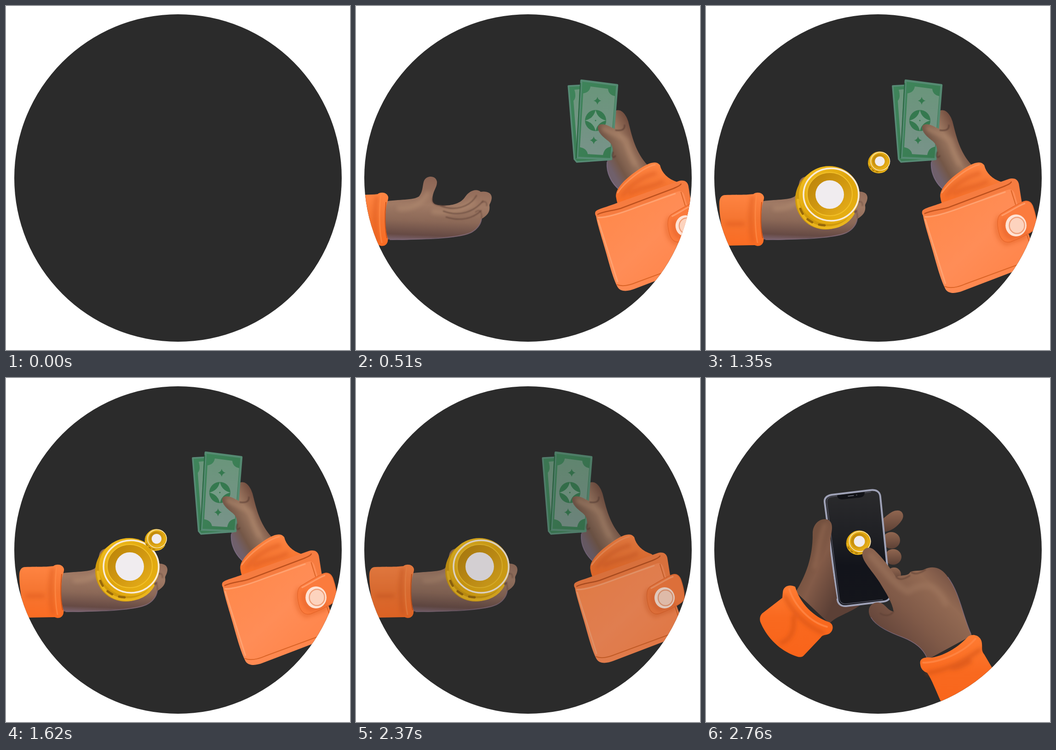
An HTML page that plays this animation: 748x748 px, repeating every 3.15 s.

```html
<!DOCTYPE html>
<html lang="en">
<head>
<meta charset="utf-8">
<title>Coins to wallet</title>
<style>
  html, body { margin: 0; width: 100%; height: 100%; overflow: hidden; background: #fff; }
  svg { display: block; width: 100%; height: 100%; }
  .line { fill: none; stroke-linecap: round; stroke-linejoin: round; }
  .soft { filter: url(#blur); }
  .crease { filter: url(#crease); }
</style>
</head>
<body>
<svg viewBox="0 0 748 748">
  <defs>
    <filter id="blur" x="-40%" y="-40%" width="180%" height="180%"><feGaussianBlur stdDeviation="4"/></filter>
    <filter id="crease" x="-20%" y="-20%" width="140%" height="140%"><feGaussianBlur stdDeviation="1.2"/></filter>
    <clipPath id="disc"><circle cx="374" cy="374" r="356"/></clipPath>

    <linearGradient id="palm" gradientUnits="userSpaceOnUse" x1="220" y1="370" x2="214" y2="510">
      <stop offset="0" stop-color="#8a6353"/><stop offset=".45" stop-color="#a07a65"/>
      <stop offset=".7" stop-color="#8b6857"/><stop offset=".92" stop-color="#664a44"/><stop offset="1" stop-color="#78606a"/>
    </linearGradient>
    <linearGradient id="grip" gradientUnits="userSpaceOnUse" x1="490" y1="340" x2="562" y2="300">
      <stop offset="0" stop-color="#70606b"/><stop offset=".25" stop-color="#745747"/>
      <stop offset=".65" stop-color="#9c7760"/><stop offset="1" stop-color="#744f40"/>
    </linearGradient>
    <linearGradient id="holder" gradientUnits="userSpaceOnUse" x1="215" y1="400" x2="300" y2="440">
      <stop offset="0" stop-color="#74513f"/><stop offset=".35" stop-color="#835b48"/><stop offset="1" stop-color="#5c4036"/>
    </linearGradient>
    <linearGradient id="tapper" gradientUnits="userSpaceOnUse" x1="390" y1="560" x2="520" y2="430">
      <stop offset="0" stop-color="#65463b"/><stop offset=".4" stop-color="#805a48"/>
      <stop offset=".8" stop-color="#936a53"/><stop offset="1" stop-color="#7c5747"/>
    </linearGradient>
    <linearGradient id="knuckle" x1="0" y1="0" x2="0" y2="1">
      <stop offset="0" stop-color="#906650"/><stop offset="1" stop-color="#5c4035"/>
    </linearGradient>
    <linearGradient id="cuff" x1="0" y1="0" x2="0" y2="1">
      <stop offset="0" stop-color="#ff7c33"/><stop offset=".45" stop-color="#f9691f"/><stop offset="1" stop-color="#f9641a"/>
    </linearGradient>
    <linearGradient id="sleeve" x1="0" y1="0" x2="0" y2="1">
      <stop offset="0" stop-color="#ff8543"/><stop offset=".5" stop-color="#f57531"/><stop offset="1" stop-color="#fb6c23"/>
    </linearGradient>
    <linearGradient id="leather" x1="0" y1="0" x2="1" y2="1">
      <stop offset="0" stop-color="#ff8747"/><stop offset=".5" stop-color="#ff8d57"/><stop offset="1" stop-color="#ff8043"/>
    </linearGradient>
    <linearGradient id="bill" x1="0" y1="0" x2="1" y2="1">
      <stop offset="0" stop-color="#3f855b"/><stop offset="1" stop-color="#37784f"/>
    </linearGradient>
    <linearGradient id="paper" x1="0" y1="0" x2="0" y2="1">
      <stop offset="0" stop-color="#6a957b"/><stop offset="1" stop-color="#789389"/>
    </linearGradient>
    <linearGradient id="gold" x1="0" y1="0" x2="1" y2="1">
      <stop offset="0" stop-color="#f4c324"/><stop offset=".5" stop-color="#dfa50c"/><stop offset="1" stop-color="#e9b317"/>
    </linearGradient>
    <linearGradient id="well" x1="0" y1="0" x2="1" y2="1">
      <stop offset="0" stop-color="#b88209"/><stop offset=".5" stop-color="#d09710"/><stop offset="1" stop-color="#e8b01b"/>
    </linearGradient>
    <linearGradient id="screen" x1="0" y1="0" x2="0" y2="1">
      <stop offset="0" stop-color="#2b2b2d"/><stop offset=".4" stop-color="#1f2024"/>
      <stop offset=".65" stop-color="#12141b"/><stop offset="1" stop-color="#14151b"/>
    </linearGradient>

    <path id="star" d="M0,-1Q.18,-.18 1,0Q.18,.18 0,1Q-.18,.18 -1,0Q-.18,-.18 0,-1Z"/>

    <!-- Coin centred on the origin, about 70 in radius -->
    <g id="coin">
      <ellipse cx="-5" cy="3" rx="66" ry="66" fill="#d09a0d"/>
      <path class="line" d="M-65,5C-62,42 -38,64 -4,65C22,66 44,54 55,34" stroke="#eab51d" stroke-width="6"/>
      <path class="line" d="M-60,24C-52,45 -34,59 -5,60" stroke="#98690a" stroke-width="5" stroke-dasharray="12 16"/>
      <ellipse cx="3" cy="-6" rx="66" ry="63" fill="url(#gold)"/>
      <ellipse cx="7" cy="-7" rx="60" ry="57" fill="none" stroke="#f8ebda" stroke-width="3.5"/>
      <ellipse cx="4" cy="-8" rx="49" ry="47" fill="url(#well)" stroke="#f2c02a" stroke-width="2"/>
      <circle cx="4" cy="-7" r="31" fill="#f0ecef"/>
    </g>
  </defs>

  <circle cx="374" cy="374" r="356" fill="#2b2b2b"/>
  <g clip-path="url(#disc)">
    <g id="trade">
      <g id="giver">
        <path fill="url(#palm)" d="M118,425C150,420 180,423 193,414C203,402 200,386 205,378C211,368 230,368 232,382C233,394 222,403 222,421C222,431 230,433 243,434C265,434 284,430 294,414C302,402 318,396 327,404C338,402 352,405 351,418C350,427 346,430 346,434C348,447 342,455 329,463C326,480 313,491 297,497C275,504 240,503 206,506C175,509 145,509 118,507Z"/>
        <path class="line soft" stroke="#b08a70" stroke-width="11" opacity=".6" d="M150,440C180,442 200,428 212,408M225,447C255,451 285,448 310,425"/>
        <g class="line crease" stroke="#604338" stroke-width="2.5">
          <path d="M239,434C270,447 303,438 318,412M246,446C280,459 312,448 332,424M252,459C284,469 310,462 328,445" opacity=".7"/>
          <path d="M222,418C219,430 231,436 250,434M330,427C337,423 341,427 340,434M316,448C325,440 330,448 329,461" opacity=".5"/>
        </g>
        <path class="line" stroke="#816a78" stroke-width="2" d="M130,508C190,507 270,507 305,493C318,487 327,476 329,463" opacity=".8"/>
        <path fill="url(#sleeve)" d="M42,411C72,410 87,411 103,409C109,404 123,404 126,415C127,421 122,428 121,443C119,466 120,489 125,505C127,519 116,525 106,520L48,521C36,502 29,460 29,429C29,418 33,411 42,411Z"/>
        <path class="line soft" stroke="#d9581f" stroke-width="8" opacity=".55" d="M101,417C96,445 96,486 102,511M46,474H80"/>
        <path class="line" stroke="#ff8a46" stroke-width="3" opacity=".7" d="M110,411C106,440 106,486 112,514"/>
        <path class="line" stroke="#b9440f" stroke-width="2" opacity=".7" d="M121,427C118,455 119,486 123,504"/>
      </g>

      <use id="bigCoin" href="#coin"/>

      <g id="payer">
        <path fill="url(#grip)" d="M508,228C520,222 531,235 536,251C544,282 551,317 578,346L520,404C498,386 487,361 490,337C499,320 506,290 506,265Z"/>
        <path fill="url(#bill)" stroke="#578a75" stroke-width="3.5" stroke-linejoin="round" d="M406,174L445,172L495,334L424,339L419,333Z"/>
        <path fill="url(#paper)" d="M419,182L430,181L424,300L417,206Q424,199 419,182Z"/>
        <path fill="url(#bill)" stroke="#558a72" stroke-width="4.5" stroke-linejoin="round" d="M434,162L512,172L499,333L425,330Z"/>
        <path class="line" stroke="#27643e" stroke-width="2" d="M432,168L423,330"/>
        <path fill="url(#paper)" d="M454,175L492,180Q493,193 507,196L498,306Q484,308 481,324L448,322Q446,310 431,307L438,190Q452,188 454,175Z"/>
        <circle cx="465" cy="249" r="23" fill="#35794f"/>
        <use href="#star" fill="#759c87" transform="translate(465 249) scale(23)"/>
        <circle cx="465" cy="249" r="1.5" fill="#35794f"/>
        <use href="#star" fill="#35794f" transform="translate(469 206) scale(8.5)"/>
        <use href="#star" fill="#35794f" transform="translate(461 292) scale(8.5)"/>
        <path fill="url(#grip)" d="M470,264C470,255 484,256 494,261C507,268 523,276 529,260L542,286C552,315 525,338 502,334C503,317 505,303 492,293C483,286 470,276 470,264Z"/>
        <path class="line soft" stroke="#ab846b" stroke-width="10" opacity=".7" d="M483,267C506,280 524,283 532,293C537,313 541,327 550,343"/>
        <path class="line crease" stroke="#573b32" stroke-width="2.5" opacity=".8" d="M509,270C521,272 529,269 528,259M503,318C499,329 504,332 508,326"/>
        <path class="line" stroke="#806f8b" stroke-width="2" opacity=".7" d="M490,340C488,362 499,386 518,400"/>
        <path fill="url(#sleeve)" d="M510,418C505,400 528,377 551,361C574,344 595,333 605,346C609,363 622,376 643,383L656,396L520,448C513,430 511,425 510,418Z"/>
        <path class="line soft" stroke="#dc5c21" stroke-width="8" opacity=".6" d="M524,412C537,391 568,370 594,364M540,408C565,393 584,396 610,382"/>
        <path class="line" stroke="#ff9a63" stroke-width="3" opacity=".7" d="M513,406C529,382 569,351 594,345"/>
      </g>

      <g id="flyers"><use id="flyer" href="#coin"/></g>

      <g id="purse"><g id="wallet">
        <path fill="#f67c40" d="M475,447C480,441 500,437 520,429L655,381C668,377 675,382 677,391L684,435L485,462C477,460 472,454 475,447Z"/>
        <path class="line" stroke="#bd511e" stroke-width="2.5" d="M480,453C494,446 515,445 530,440L644,397C653,393 659,391 661,387"/>
        <path fill="url(#leather)" d="M476,455C481,461 494,457 512,454C558,443 605,419 652,404C663,400 667,406 669,414L674,432L713,539C711,554 702,561 683,568L560,615C545,621 529,622 523,611C512,590 503,553 495,526C486,495 477,466 476,455Z"/>
        <path class="line" stroke="#ffa878" stroke-width="3" opacity=".8" d="M481,460C500,461 537,448 566,437L648,408M481,466L523,599"/>
        <path class="line" stroke="#da6427" stroke-width="2" d="M522,606C535,611 550,607 564,601L697,552M661,405L670,434M693,495L707,537"/>
        <path class="line soft" stroke="#e5662a" stroke-width="9" opacity=".6" d="M636,461C624,482 634,509 651,516L690,502"/>
        <path fill="#fb7b3d" stroke="#e9692d" stroke-width="1.5" d="M639,454C656,444 673,433 687,428C698,424 704,431 707,440C712,455 715,472 713,482C708,492 678,505 661,512C648,516 641,509 637,499C631,481 630,461 639,454Z"/>
        <path class="line soft" stroke="#e4622a" stroke-width="8" opacity=".7" d="M646,468C643,482 648,500 662,503L690,493"/>
        <path class="line" stroke="#ff9b68" stroke-width="3" d="M642,457C658,449 675,437 689,432"/>
        <ellipse cx="671" cy="478" rx="22" ry="23" fill="#ffe3d5"/>
        <ellipse cx="673" cy="478" rx="16" ry="17" fill="#fdd3be" stroke="#ef9f79" stroke-width="2.5"/>
      </g></g>
    </g>

    <g id="phone">
      <g fill="url(#knuckle)">
        <path d="M379,311C391,302 402,288 417,288C428,288 432,300 426,309C416,324 402,334 385,335Z"/>
        <ellipse cx="403" cy="353" rx="19" ry="18"/>
        <ellipse cx="407" cy="389" rx="18" ry="17"/>
        <ellipse cx="409" cy="427" rx="15" ry="15"/>
      </g>
      <path fill="url(#holder)" d="M232,340C231,321 244,306 260,307L310,485L335,494C309,513 286,516 268,534L195,465C217,430 232,390 232,340Z"/>
      <path fill="url(#screen)" stroke="#9fa2b7" stroke-width="4" d="M258,270C257,261 263,256 273,254L356,244C370,242 378,247 379,258L400,468C402,479 396,485 386,486L305,496C294,497 287,491 286,482Z"/>
      <path class="line" stroke="#50515e" stroke-width="1.5" d="M263,272L290,480C291,488 297,492 305,491L384,482M263,271C262,263 266,259 274,258L358,248"/>
      <path fill="#111217" d="M285,255L345,248C345,257 340,259 334,260L297,264C290,264 286,262 285,255Z"/>
      <path class="line" stroke="#777985" stroke-width="1.5" d="M309,257L321,255.5M327,254.5h1"/>
      <path fill="url(#holder)" d="M232,345C231,323 244,306 260,307C275,309 276,323 272,341C267,370 272,397 276,423L285,480C265,476 232,430 232,345Z"/>
      <path class="line soft" stroke="#966a53" stroke-width="10" opacity=".55" d="M258,320C244,355 245,384 236,411"/>
      <use href="#coin" transform="translate(332 358) scale(.385)"/>
      <path fill="url(#tapper)" d="M340,386C338,371 354,363 366,374C387,394 400,413 413,433C425,427 439,432 444,422C453,417 467,421 475,416C497,406 514,415 526,433C552,468 557,513 578,560L482,612C473,588 450,572 422,562C395,552 363,533 356,517C349,499 361,487 375,488C391,490 393,505 408,508C405,487 391,467 378,445C361,419 343,402 340,386Z"/>
      <path class="line soft" stroke="#a27960" stroke-width="15" opacity=".45" d="M359,387C390,421 413,453 439,464C477,442 501,448 521,490"/>
      <path class="line crease" stroke="#5a3d33" stroke-width="2.5" opacity=".7" d="M414,433C421,440 430,438 443,430M446,422C455,429 466,424 477,417M408,508C400,518 389,518 379,512"/>
      <path class="line" stroke="#86728d" stroke-width="1.5" opacity=".7" d="M526,433C552,468 557,513 576,556M359,521C370,541 404,555 428,564C456,575 473,590 480,608"/>
      <path fill="url(#cuff)" d="M167,466C168,452 182,448 194,454C204,490 235,520 268,531C279,536 277,550 268,556C260,560 254,557 249,565L213,603C207,610 198,606 188,602C155,588 130,560 118,530C116,522 118,516 122,512L166,478Z"/>
      <path class="line soft" stroke="#cf4f18" stroke-width="9" opacity=".55" d="M172,475C188,510 219,540 254,554M190,520C194,548 184,569 164,576"/>
      <path class="line" stroke="#ff8746" stroke-width="4" opacity=".8" d="M181,459C193,496 226,531 263,541"/>
      <path fill="url(#cuff)" d="M466,623C463,609 476,606 490,608C522,603 551,583 570,562C585,553 600,564 600,578C601,588 598,592 605,601L642,664L540,740L510,702C500,680 491,656 481,641C472,638 467,632 466,623Z"/>
      <path class="line soft" stroke="#ce5018" stroke-width="9" opacity=".55" d="M484,641C527,634 568,612 595,591M535,631C550,631 560,624 574,616"/>
      <path class="line" stroke="#ff8746" stroke-width="4" opacity=".8" d="M472,619C510,619 561,596 586,567"/>
    </g>
  </g>
</svg>
<script>
const LOOP = 3150, STEP = 30;
const byId = id => document.getElementById(id);
const progress = (time, start, end) => Math.min(1, Math.max(0, (time - start) / (end - start)));
const place = (id, x, y, scale = 1) =>
  byId(id).setAttribute('transform', `translate(${x} ${y}) scale(${scale})`);
const fade = (id, opacity) => byId(id).setAttribute('opacity', opacity);

function draw(time) {
  const away = 1 - progress(time, 0, 600);
  place('giver', -373 * away, 0);
  place('payer', 373 * away, 0);
  place('purse', 305 * away, 0);

  const coinIn = progress(time, 600, 900);
  place('bigCoin', 265 - 23 * (1 - coinIn), 417 + 48 * (1 - coinIn));
  fade('bigCoin', coinIn);

  // Three coins hop along the same parabola into the wallet.
  const flying = time >= 1170 && time < 2250;
  const hop = flying ? ((time - 1170) % 360) / 360 : 0;
  const x = 304 + 239 * hop ** 1.72;
  place('flyer', x, 340 + 0.00437 * (x - 378.4) ** 2, 0.345);
  fade('flyers', flying ? 1 : 0);

  const swell = 1 + 0.038 * (progress(time, 1140, 1290) - progress(time, 2220, 2310));
  place('wallet', 590 * (1 - swell), 500 * (1 - swell), swell);

  fade('trade', 1 - progress(time, 2340, 2550));
  place('phone', 0, 490 * (1 - progress(time, 2550, 2760)));
  // The phone waits outside the stage until the trade has faded.
  fade('phone', time < 2550 ? 0 : 1);
}

const start = performance.now();
function tick() {
  const time = (performance.now() - start) % LOOP;
  draw(Math.floor(time / STEP) * STEP);
  requestAnimationFrame(tick);
}
tick();
</script>
</body>
</html>
```
